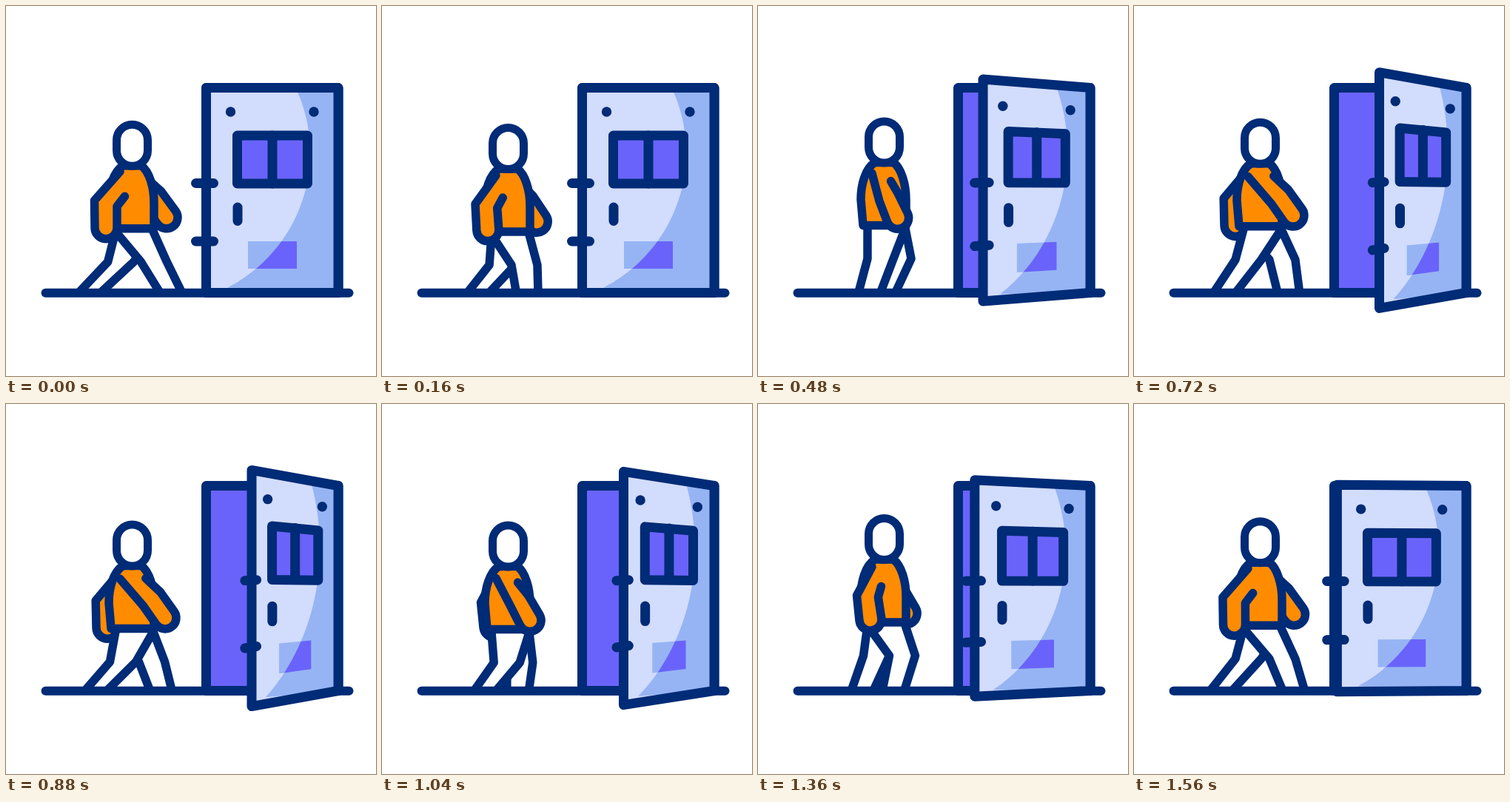
An HTML page with a canvas for the animation above (1600 ms loop, 500 px wide and 500 px high).

```html
<!DOCTYPE html>
<html lang="en">
<head>
<meta charset="utf-8">
<title>Walking to the door</title>
<style>
html, body { margin: 0; width: 100%; height: 100%; overflow: hidden; background: #fff; }
canvas { display: block; }
</style>
</head>
<body>
<canvas id="stage" width="500" height="500"></canvas>
<script>
const ctx = document.getElementById('stage').getContext('2d');
const LOOP = 1600, STEP = 40;
const NAVY = '#002b76', ORANGE = '#ff8c00', PURPLE = '#6a63fb', PALE = '#d2dcfc', MID = '#96b4f4';
const LINE = 11.5, FRAME = 13;

const wave = (t, shift = 0) => Math.cos(2 * Math.PI * (t + shift) / LOOP);

function smooth(from, to, t) {
  const s = Math.min(1, Math.max(0, (t - from) / (to - from)));
  return s * s * (3 - 2 * s);
}

function trace(points, closed) {
  ctx.beginPath();
  points.forEach(([x, y]) => ctx.lineTo(x, y));
  if (closed) ctx.closePath();
}

function fill(color) {
  ctx.fillStyle = color;
  ctx.fill();
}

function stroke(width) {
  ctx.lineWidth = width;
  ctx.strokeStyle = NAVY;
  ctx.stroke();
}

function line(points, width) {
  trace(points);
  stroke(width);
}

// The foot travels at a nearly even pace; the knee swings slightly ahead of it.
function leg(t, bob) {
  const p = (t % LOOP) / LOOP;
  const foot = 169 + 51.5 * (4 * Math.abs(p - 0.5) - 1) - 7 * Math.abs(Math.sin(2 * Math.PI * p));
  const knee = 177.5 + 23 * wave(t, 60), kneeY = 345 + bob;
  const side = (hip, dir) => [
    [hip, 304 + bob],
    [knee + 17.5 * dir, kneeY],
    [foot + 14.5 * dir + (foot - knee) * 0.25, 383 + (383 - kneeY) * 0.25]
  ];
  ctx.save();
  ctx.beginPath();
  ctx.rect(0, 0, 500, 388);
  ctx.clip();
  trace([...side(148, -1), ...side(199, 1).reverse()]);
  fill('#fff');
  stroke(LINE);
  ctx.restore();
}

// Every joint of the arm sways around its rest point with the same rhythm.
function arm(t, bob) {
  const sway = wave(t);
  const joint = (x, dx, y, dy) => [x + dx * sway, y + dy * sway + bob];
  const [ex, ey] = joint(153.5, -34, 266, -4);
  const [hx, hy] = joint(176, -41, 292, 7);
  const [fx, fy] = joint(180, -30, 260, 10);
  const a = Math.atan2(hy - (ey + fy) / 2, hx - (ex + fx) / 2);
  ctx.beginPath();
  ctx.moveTo(...joint(154, 0, 228, -5));
  ctx.lineTo(ex, ey);
  ctx.arc(hx, hy, 15, a + Math.PI / 2, a - Math.PI / 2, true);
  ctx.lineTo(fx, fy);
  ctx.lineTo(...joint(175, -14.5, 244, 12.5));
  fill(ORANGE);
  stroke(LINE);
}

function torso(bob) {
  ctx.save();
  ctx.translate(0, bob);
  ctx.beginPath();
  ctx.moveTo(158, 215);
  ctx.lineTo(183, 215);
  ctx.bezierCurveTo(194, 223, 200, 245, 200, 265);
  ctx.lineTo(200, 300);
  ctx.lineTo(142, 300);
  ctx.lineTo(139, 265);
  ctx.bezierCurveTo(139, 245, 145, 223, 158, 215);
  ctx.closePath();
  ctx.restore();
  fill(ORANGE);
  stroke(LINE);
}

function head(bob) {
  ctx.beginPath();
  ctx.roundRect(149.5, 159.5 + bob, 42, 56, 21);
  fill('#fff');
  stroke(11);
}

function person(t) {
  const bob = 5 * wave(2 * (t - 180));
  const opposite = t + LOOP / 2;
  arm(opposite, bob);
  leg(opposite, bob);
  leg(t, bob);
  torso(bob);
  head(bob);
  arm(t, bob);
}

function door(t) {
  const swing = 61.5 * smooth(175, 750, t) * (1 - smooth(895, 1680, t));
  const left = 270.5, right = 449, top = 110.5, bottom = 387.5, mid = 249;
  const place = ([x, y]) => {
    const u = (x - left) / (right - left);
    const grow = 1 + swing * 0.00247 * (1 - u);
    const lift = swing * 0.13 * u * (1 - u);
    return [x + swing * (1 - u), mid + (y - mid) * grow - lift];
  };
  const quad = (x0, y0, x1, y1) => [[x0, y0], [x1, y0], [x1, y1], [x0, y1]].map(place);
  const bar = (x0, y0, x1, y1) => line([[x0, y0], [x1, y1]].map(place), FRAME);
  const panel = quad(left, top, right, bottom);
  const plaque = quad(327, 318, 393, 355);

  const shade = [];
  for (let y = top; y <= bottom; y += (bottom - top) / 40) {
    shade.push(place([206 + Math.sqrt(205 ** 2 - (y - 198) ** 2), y]));
  }
  shade.push(place([right, bottom]), place([right, top]));

  trace(panel, true);
  fill(PALE);
  trace(shade, true);
  fill(MID);
  trace(plaque, true);
  fill(MID);
  ctx.save();
  trace(shade, true);
  ctx.clip();
  trace(plaque, true);
  fill(PURPLE);
  ctx.restore();

  trace(quad(312.5, 175, 407.5, 240), true);
  fill(PURPLE);
  stroke(FRAME);
  bar(360, 175, 360, 240);
  bar(313, 272, 313, 290.5);
  for (const x of [303.5, 416]) {
    ctx.beginPath();
    ctx.arc(...place([x, 143]), 6.7, 0, 2 * Math.PI);
    fill(NAVY);
  }
  trace(panel, true);
  stroke(FRAME);
  for (const y of [239.5, 318]) bar(256.5, y, 280.5, y);
}

function draw(t) {
  ctx.fillStyle = '#fff';
  ctx.fillRect(0, 0, 500, 500);
  ctx.lineCap = ctx.lineJoin = 'round';
  person(t);
  ctx.beginPath();
  ctx.rect(270.5, 110.5, 178.5, 277);
  fill(PURPLE);
  stroke(FRAME);
  line([[53.5, 387.8], [463.5, 387.8]], 12);
  door(t);
}

function tick() {
  const t = performance.now() % LOOP;
  draw(Math.floor(t / STEP) * STEP);
  requestAnimationFrame(tick);
}
tick();
</script>
</body>
</html>
```
